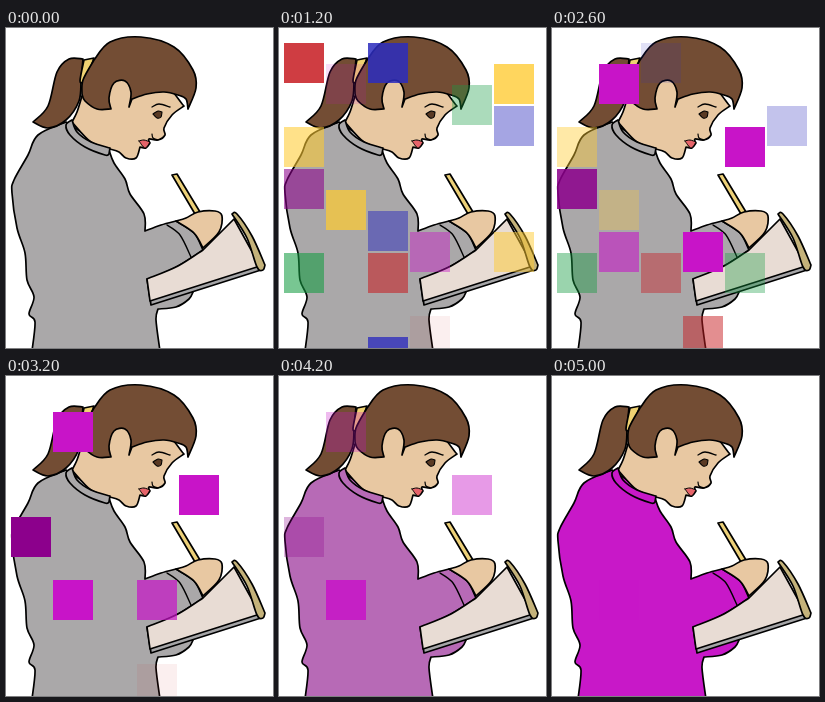
Recreate the animation shown at these times as an HTML page with a canvas. Size 267x320 px, loop 5200 ms.

```html
<!DOCTYPE html>
<html lang="en">
<head>
<meta charset="utf-8">
<title>Writing figure</title>
<style>
html, body { margin: 0; width: 100%; height: 100%; overflow: hidden; background: #fff; }
canvas { display: block; width: 100vw; height: 100vh; }
</style>
</head>
<body>
<canvas id="stage"></canvas>
<script>
const W = 267, H = 320, STEP = 200, STEPS = 26, FADE = 7;
const canvas = document.getElementById('stage');
const ctx = canvas.getContext('2d');

const HAIR = '#734d34', SKIN = '#e8c8a2', PAPER = '#e8dcd4';
const GREY = [170, 168, 169], MAGENTA = [200, 24, 200];

// Per colour: column, row, step of full strength, reach in steps
const TILES = {
  '#c81e23': [[0, 0, 5], [2, 10, 9], [3, 13, 11, 5.5]],
  '#2d2dbe': [[2, 0, 7], [5, 3, 9, 6], [2, 8, 7.5, 5], [2, 14, 4.5]],
  '#149b41': [[4, 2, 1.5], [0, 10, 9], [4, 10, 11, 4.5]],
  '#ffcb32': [[5, 1, 4.5], [0, 4, 9], [1, 7, 8], [5, 9, 2.5]],
  '#c814c8': [[1, 1, 14, 9], [4, 4, 15, 9], [1, 9, 18, 9], [3, 9, 12, 9]],
  '#8c008c': [[0, 6, 3], [0, 6, 15, 8]]
};

const clamp = v => Math.max(0, Math.min(1, v));

// Smooth runs through points; "|" marks a corner shared by two runs.
function curve(text) {
  const path = new Path2D();
  let last = null;
  for (const run of text.split('|')) {
    const pts = run.trim().split(/\s+/).map(p => p.split(',').map(Number));
    if (last) pts.unshift(last);
    else path.moveTo(...pts[0]);
    for (let i = 0; i < pts.length - 1; i++) {
      const b = pts[i], c = pts[i + 1];
      const a = pts[i - 1] || b, d = pts[i + 2] || c;
      path.bezierCurveTo(
        b[0] + (c[0] - a[0]) / 6, b[1] + (c[1] - a[1]) / 6,
        c[0] - (d[0] - b[0]) / 6, c[1] - (d[1] - b[1]) / 6, c[0], c[1]);
    }
    last = pts[pts.length - 1];
  }
  return path;
}

function closed(text) {
  const path = curve(text);
  path.closePath();
  return path;
}

const shapes = {
  body: closed('60,94 32,107 22,127 8,152 6,165 11,200 19,225 21,252 28,269 23,286 29,294 26,323' +
    '|154,323|150,292 152,281|170,279 183,271 187,264|145,251|172,238 197,222' +
    '|188,205 170,193|155,197 139,203|138,186 124,166 119,151 108,135 103,122'),
  collar: closed('66,92 60,97 64,107 79,119 99,127 103,126|104,120|85,114 71,104 66,92'),
  face: closed('76,68 71,84 66,94|85,114 104,121|113,124 120,130 130,130 134,119' +
    '|140,120 144,115|143,111 152,112 159,107 158,100 166,87 178,78|150,50 100,50'),
  hair: closed('88,32 104,14 135,9 168,19 187,42 190,60 182,81|180,71 172,67 158,64 141,66 126,71' +
    '|123,79|125,64 119,53 108,55 103,70 105,81|91,81 79,73 76,66|77,52 88,32'),
  tail: closed('77,31 63,31 51,44 42,78 27,94|42,100 60,92 73,73 75,53|77,31'),
  band: closed('78,32 88,30|84,41 78,54|74,53 78,32'),
  lips: closed('133,113 138,112 144,114|139,120 133,113'),
  eye: closed('147,86 152,83 156,84|155,89 151,90 147,86'),
  brow: curve('146,79 153,76 164,79'),
  nostril: curve('146,106 147,110 152,112'),
  under: closed('141,251|145,277|255,242|254,238'),
  paper: closed('141,251|172,238 197,222|228,191|254,238|144,273'),
  clip: closed('226,186 231,186 246,208 259,237|257,242 251,239 241,210 226,186'),
  hand: closed('170,193|180,190 192,184 209,183 216,188 213,204 197,220|188,205 170,193'),
  pencil: closed('166,147 171,146|194,184|189,186|166,147'),
  cuff: curve('161,197 174,207 185,229')
};

function draw(name, fill, width = 1.7) {
  if (fill) {
    ctx.fillStyle = fill;
    ctx.fill(shapes[name]);
  }
  ctx.lineWidth = width;
  ctx.stroke(shapes[name]);
}

function drawFigure(cloth) {
  ctx.strokeStyle = '#000';
  ctx.lineJoin = ctx.lineCap = 'round';
  draw('body', cloth);
  draw('face', SKIN);
  draw('collar', cloth);
  draw('tail', HAIR);
  draw('band', '#efd272');
  draw('hair', HAIR);
  draw('lips', '#e6646a', 1);
  draw('eye', '#5a3a24', 1.1);
  draw('brow', null, 1.3);
  draw('nostril', null, 1.2);
  draw('under', '#a5a5a7');
  draw('paper', PAPER);
  draw('clip', '#c4b27a');
  draw('pencil', '#ecd078');
  draw('hand', SKIN);
  draw('cuff', null, 1.4);
}

// Every tile rises and falls at the same rate; the loop opens empty.
function drawTile(step, color, [col, row, peak, reach = FADE]) {
  const alpha = clamp(Math.min(step / 6, (reach - Math.abs(step - peak)) / FADE));
  ctx.globalAlpha = alpha;
  ctx.fillStyle = color;
  ctx.fillRect(5 + 42 * col, 15 + 21 * row, 40, 40);
  ctx.globalAlpha = 1;
}

function render(step) {
  const dpr = window.devicePixelRatio || 1;
  const w = Math.round(innerWidth * dpr), h = Math.round(innerHeight * dpr);
  if (canvas.width !== w || canvas.height !== h) {
    canvas.width = w;
    canvas.height = h;
  }
  ctx.setTransform(w / W, 0, 0, h / H, 0, 0);
  ctx.fillStyle = '#fff';
  ctx.fillRect(0, 0, W, H);
  const mix = clamp((step - 18) / FADE);
  drawFigure(`rgb(${GREY.map((v, i) => Math.round(v + (MAGENTA[i] - v) * mix))})`);
  for (const [color, tiles] of Object.entries(TILES)) {
    tiles.forEach(tile => drawTile(step, color, tile));
  }
}

const start = performance.now();
function tick() {
  render(Math.floor((performance.now() - start) / STEP) % STEPS);
  requestAnimationFrame(tick);
}
tick();
</script>
</body>
</html>
```
